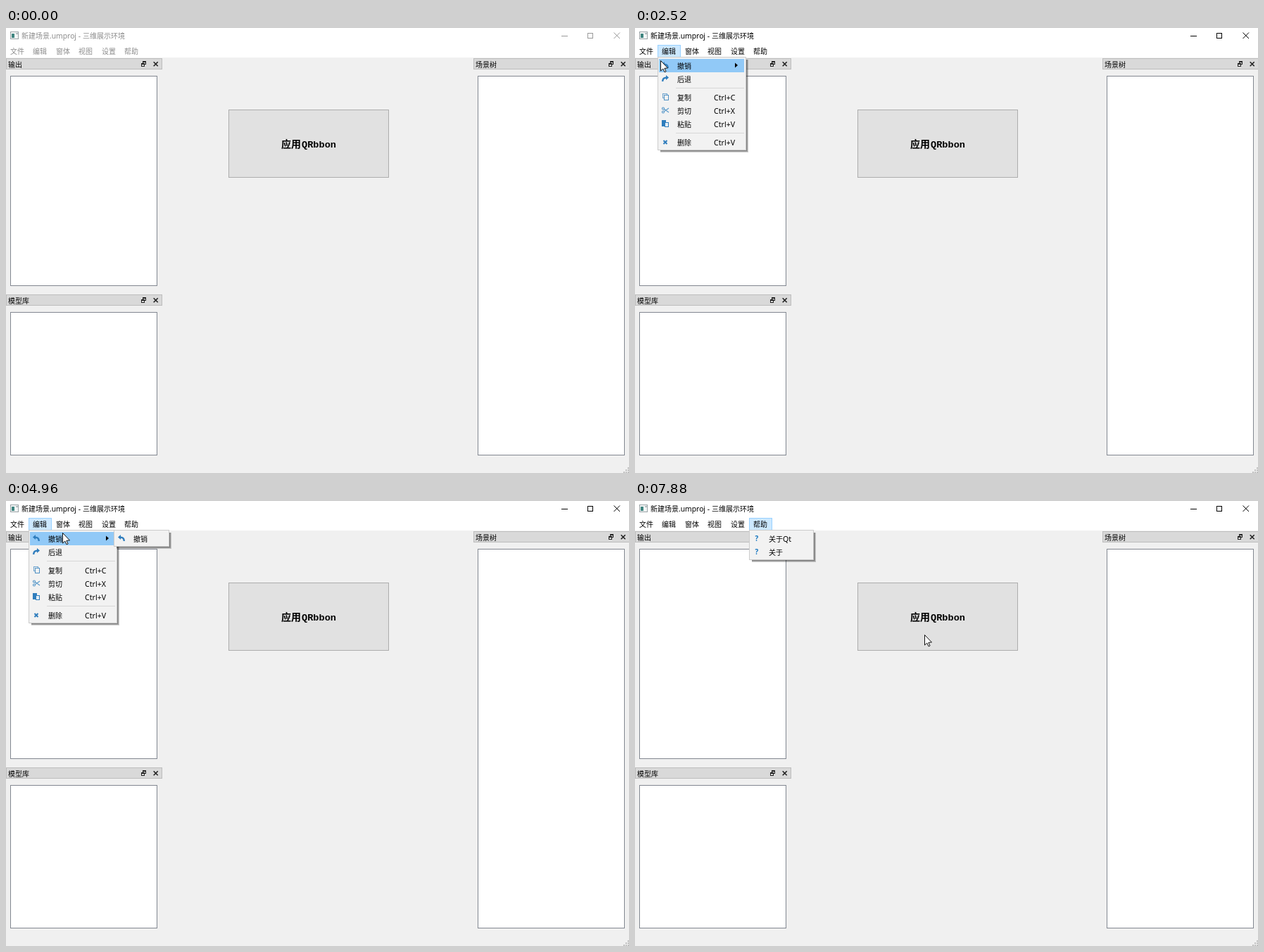
Recreate the animation shown at these times as an HTML page with a canvas. Size 885 px wide and 633 px high, loop 8 s.

```html
<!DOCTYPE html>
<html lang="zh-CN">
<head>
<meta charset="utf-8">
<title>三维展示环境</title>
<style>
html, body { margin: 0; width: 100%; height: 100%; overflow: hidden; background: #f0f0f0; }
canvas { display: block; }
</style>
</head>
<body>
<canvas id="stage" width="885" height="633"></canvas>
<script>
const g = document.getElementById('stage').getContext('2d');
const LOOP = 8000, STEP = 79, TICK = 10;
const ACTIVATE = 1810, OPEN = 1890, SUB_DELAY = 235;
const BAR_TOP = 24, BAR_END = 42, ROW = 19, GAP = 7, PITCH = 32.5;
const UI = '"Noto Sans CJK SC", "Noto Sans CJK", sans-serif';
const LATIN = '"Noto Sans", "Open Sans", sans-serif';
const BLUE = '#2f7dbd';

const UNDO_MENU = { w: 79, items: [{ label: '撤销', icon: 'undo' }] };
const SEP = null;
const BAR = [
  { label: '文件', w: 126, items: [
    { label: '新建', key: 'Ctrl+N' }, { label: '打开', key: 'Ctrl+O' }, SEP,
    { label: '保存', key: 'Ctrl+S' }, SEP, { label: '退出', key: 'Ctrl+Q' }] },
  { label: '编辑', w: 126, items: [
    { label: '撤销', icon: 'undo', sub: UNDO_MENU }, { label: '后退', icon: 'redo' }, SEP,
    { label: '复制', key: 'Ctrl+C', icon: 'copy' }, { label: '剪切', key: 'Ctrl+X', icon: 'cut' },
    { label: '粘贴', key: 'Ctrl+V', icon: 'paste' }, SEP,
    { label: '删除', key: 'Ctrl+V', icon: 'cross' }] },
  { label: '窗体', w: 130, items: [{ label: '保存当前窗体布局' }, { label: '恢复默认窗体布局' }] },
  { label: '视图', w: 79, items: [{ label: '无图标' }] },
  { label: '设置' },
  { label: '帮助', w: 92, items: [
    { label: '关于', tail: 'Qt', icon: 'help' }, { label: '关于', icon: 'help' }] }
];

// Pointer moves: from when, until when, to where
const ENTRY = { x: 828, y: 581 };
const MOVES = [
  [290, 1090, 45, 29],
  [1170, 1250, 25, 21],
  [1330, 1650, 15, 29],
  [2280, 2360, 34, 34],
  [2440, 2520, 36, 46],
  [2600, 3070, 72, 48],
  [3150, 3550, 77, 32],
  [3860, 4010, 55, 36],
  [4170, 4250, 55, 41],
  [4330, 4490, 62, 47],
  [4570, 4960, 80, 45],
  [5040, 5440, 85, 31],
  [5750, 6220, 121, 31],
  [6300, 6540, 145, 33],
  [6940, 7090, 173, 34],
  [7240, 7880, 411, 190]
];

const barX = i => Math.floor(PITCH * i);

// The pointer advances in even steps and rests between moves.
function pointerAt(t) {
  let { x, y } = ENTRY;
  for (const [start, end, toX, toY] of MOVES) {
    if (t < start) break;
    const n = Math.round((end - start) / STEP) + 1;
    const f = Math.min(1, (Math.floor((t - start) / STEP + .1) + 1) / n);
    x += (toX - x) * f;
    y += (toY - y) * f;
  }
  return { x: Math.round(x), y: Math.round(y) };
}

// Menus follow the pointer: replay its path up to t.
function menuState(t) {
  let sel = -1, hotSince = -1;
  for (let s = 0; s <= t; s += TICK) {
    const { x, y } = pointerAt(s), open = s >= OPEN;
    const over = Math.floor(x / PITCH);
    if (y >= BAR_TOP && y < BAR_END && over < BAR.length) sel = over;
    else if (!open) sel = -1;
    const menu = BAR[sel], left = barX(sel);
    const hot = open && menu.items && menu.items[0].sub &&
      x > left + 1 && x < left + menu.w && y > BAR_END + 1 && y < BAR_END + 2 + ROW;
    if (!hot) hotSince = -1;
    else if (hotSince < 0) hotSince = s;
  }
  const hot = hotSince >= 0;
  return { sel, open: t >= OPEN, hot, sub: hot && t - hotSince >= SUB_DELAY };
}

function fill(x, y, w, h, color) {
  g.fillStyle = color;
  g.fillRect(x, y, w, h);
}

function box(x, y, w, h, color, edge) {
  fill(x, y, w, h, edge);
  fill(x + 1, y + 1, w - 2, h - 2, color);
}

function frame(x, y, w, h, color) {
  g.strokeStyle = color;
  g.lineWidth = 1;
  g.strokeRect(x + .5, y + .5, w - 1, h - 1);
}

// y is the middle of the line of text
function text(s, x, y, color = '#000', font = '10px ' + UI) {
  g.font = font;
  g.fillStyle = color;
  g.fillText(s, x, y + 4);
}

function cross(x, y, size, color, width) {
  g.strokeStyle = color;
  g.lineWidth = width;
  g.beginPath();
  g.moveTo(x, y); g.lineTo(x + size, y + size);
  g.moveTo(x + size, y); g.lineTo(x, y + size);
  g.stroke();
}

function poly(points, color) {
  g.beginPath();
  points.forEach(([x, y]) => g.lineTo(x, y));
  g.closePath();
  g.fillStyle = color;
  g.fill();
}

function bentArrow() {
  poly([[-5, -1.5], [-1, -5], [-1, 2]], BLUE);
  g.strokeStyle = BLUE;
  g.lineWidth = 2.4;
  g.beginPath();
  g.moveTo(-1.5, -1.3);
  g.quadraticCurveTo(3.6, -1.6, 3.8, 4);
  g.stroke();
}

const ICONS = {
  undo: bentArrow,
  redo() { g.scale(-1, 1); bentArrow(); },
  copy() {
    frame(-4, -5, 7, 7, '#6fa5cf');
    box(-2, -3, 7, 8, '#f2f2f2', '#4f90c4');
  },
  cut() {
    g.strokeStyle = '#5b9aca';
    g.lineWidth = 1.2;
    g.beginPath();
    for (const s of [-1, 1]) {
      g.moveTo(-2, 2 * s);
      g.lineTo(5, -3 * s);
      g.moveTo(-1.5, 2.5 * s);
      g.arc(-3, 2.5 * s, 1.5, 0, 7);
    }
    g.stroke();
  },
  paste() {
    fill(-5, -5, 6, 9, BLUE);
    box(-1, -2, 6, 7, '#e4eff8', BLUE);
  },
  cross() { cross(-2.5, -2, 5, BLUE, 2); },
  help() { text('?', -2.5, 0, '#1878c0', 'bold 10px ' + LATIN); }
};

function icon(name, x, y) {
  g.save();
  g.translate(x, y);
  ICONS[name]();
  g.restore();
}

function menuRow(it, x, top, w, hot) {
  const mid = top + ROW / 2;
  if (hot) fill(x + 2, top, w - 5, ROW, '#91c9f7');
  if (it.icon) icon(it.icon, x + 11, Math.floor(mid));
  text(it.label, x + 28, mid);
  if (it.tail) text(it.tail, x + 48, mid, '#000', '10.5px ' + LATIN);
  if (it.key) text(it.key, x + 80, mid, '#000', '10.6px ' + LATIN);
  if (it.sub) {
    const ax = x + 110, ay = mid - .5;
    poly([[ax, ay - 3.5], [ax + 4, ay], [ax, ay + 3.5]], '#000');
  }
}

function popup({ w, items }, x, hot) {
  const y = BAR_END - 1;
  const h = items.reduce((sum, it) => sum + (it ? ROW : GAP), 5);
  for (let i = 3; i > 0; i--) fill(x + 4, y + 4, w - 4 + i, h - 4 + i, 'rgba(0,0,0,.2)');
  box(x, y, w, h, '#f2f2f2', '#cccccc');
  let top = y + 3;
  items.forEach((it, i) => {
    if (it) menuRow(it, x, top, w, hot && i === 0);
    else fill(x + 26, top + 3, w - 29, 1, '#d7d7d7');
    top += it ? ROW : GAP;
  });
}

function titleBar(active) {
  const ink = active ? '#000' : '#8c8c8c';
  const glyph = active ? '#000' : '#999';
  fill(0, 0, 885, BAR_END, '#fff');
  box(6, 5, 12, 11, '#f4f6f6', '#9aa3a6');
  fill(8, 8, 4, 6, '#3f8580');
  fill(14, 7, 3, 2, '#b5bdc0');
  text('新建场景', 22, 11, ink);
  text('.umproj - ', 62, 11, ink, '10.3px ' + LATIN);
  text('三维展示环境', 109, 11, ink);
  fill(789, 11, 9, 1, glyph);
  frame(826, 7, 8, 8, glyph);
  cross(863.5, 6.5, 8.5, glyph, 1);
}

function menuBar(active, { sel, open }) {
  BAR.forEach(({ label }, i) => {
    const x = barX(i);
    if (i === sel) {
      const [color, edge] = open ? ['#cce8ff', '#99d1ff'] : ['#e5f3ff', '#cce8ff'];
      box(x, BAR_TOP, barX(i + 1) - x, BAR_END - BAR_TOP, color, edge);
    }
    text(label, x + 6, 33, active ? '#000' : '#8c8c8c');
  });
}

function dock(label, x, y, bottom) {
  box(x, y, 222, 16, '#d9d9d9', '#bdbdbd');
  text(label, x + 3, y + 8.5);
  const ix = x + 192, iy = y + 4;
  frame(ix + 2, iy, 5, 5, '#222');
  fill(ix + 2, iy, 5, 2, '#222');
  box(ix, iy + 3, 5, 5, '#d9d9d9', '#222');
  fill(ix, iy + 3, 5, 2, '#222');
  cross(x + 209.7, y + 5.2, 6, '#222', 1.6);
  box(x + 6, y + 25, 209, bottom - y - 25, '#fff', '#828790');
}

function grip() {
  for (let r = 0; r < 3; r++) {
    for (let c = 0; c <= r; c++) fill(883 - 3 * c, 625 + 3 * r, 2, 2, '#bfbfbf');
  }
}

function pointer({ x, y }) {
  g.save();
  g.translate(x + .5, y + .5);
  poly([[0, 0], [0, 14.5], [3.3, 11.5], [5.6, 16.3], [7.6, 15.4], [5.4, 10.8], [10, 10.5]], '#fff');
  g.strokeStyle = '#111';
  g.lineWidth = 1;
  g.stroke();
  g.restore();
}

function draw(t) {
  const state = menuState(t), active = t >= ACTIVATE;
  const menu = BAR[state.sel];
  fill(0, 0, 885, 633, '#f0f0f0');
  titleBar(active);
  menuBar(active, state);
  dock('输出', 0, 43, 367);
  dock('模型库', 0, 379, 608);
  dock('场景树', 664, 43, 608);
  box(316, 116, 228, 97, '#e1e1e1', '#adadad');
  text('应用', 391, 165.5, '#000', 'bold 14px ' + UI);
  text('QRbbon', 420, 166, '#000', 'bold 13.6px "Liberation Mono", monospace');
  grip();
  if (state.open && menu.items) popup(menu, barX(state.sel), state.hot);
  if (state.sub) popup(menu.items[0].sub, barX(state.sel) + 121, false);
  if (t >= MOVES[0][0]) pointer(pointerAt(t));
}

function tick() {
  draw(performance.now() % LOOP);
  requestAnimationFrame(tick);
}
tick();
</script>
</body>
</html>
```
